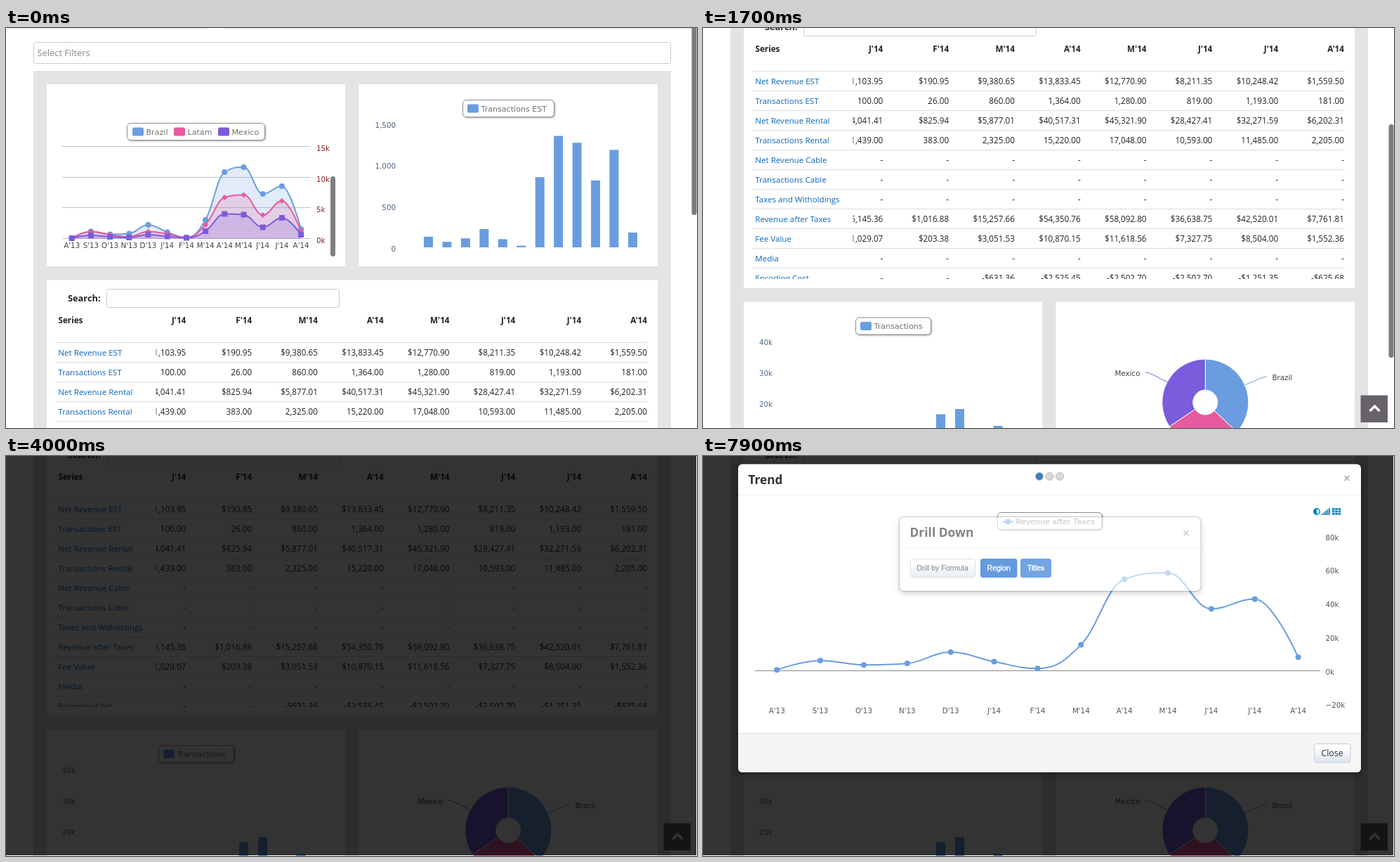
Animation of 984x569 px, one loop 8 s. Source, as an HTML page:

```html
<!DOCTYPE html>
<html lang="en">
<head>
<meta charset="utf-8">
<title>Revenue dashboard</title>
<style>
html, body { margin: 0; width: 100%; height: 100%; overflow: hidden; background: #fff; }
svg { display: block; font-family: "Open Sans", "Noto Sans", sans-serif; }
.box { fill: #fff; stroke: #909090; filter: drop-shadow(1px 1px 1px rgba(0,0,0,.35)); }
.window { fill: #fff; stroke: rgba(0,0,0,.3); stroke-width: 2; paint-order: stroke; filter: drop-shadow(0 3px 4px rgba(0,0,0,.3)); }
.ui { font-family: "Liberation Sans", Arial, sans-serif; }
.plot { font-family: "DejaVu Sans", sans-serif; }
</style>
</head>
<body>
<svg id="stage" width="984" height="569" viewBox="0 0 984 569"></svg>
<script>
const BLUE = '#699de0', PINK = '#e85a9e', PURPLE = '#7a5cdc', INK = '#222';
const MONTHS = "A'13 S'13 O'13 N'13 D'13 J'14 F'14 M'14 A'14 M'14 J'14 J'14 A'14".split(' ');

// Text is placed by the vertical centre of its capitals.
const text = (x, y, str, size, fill, anchor = 'start', extra = '') =>
  `<text x="${x}" y="${y + size * .36}" font-size="${size}" fill="${fill}" text-anchor="${anchor}" ${extra}>${str}</text>`;
const axisText = (x, y, str, fill, anchor) => text(x, y, str, 10.3, fill, anchor, 'class="plot"');
const legendText = (x, y, str) => text(x, y, str, 11.1, '#707070', 'start', 'class="plot"');
const rect = (x, y, w, h, fill, extra = '') =>
  `<rect x="${x}" y="${y}" width="${w}" height="${h}" fill="${fill}" ${extra}/>`;
const box = (x, y, w, h, r, cls = 'box') =>
  `<rect class="${cls}" x="${x}" y="${y}" width="${w}" height="${h}" rx="${r}"/>`;
const line = (x1, y1, x2, y2, stroke, w = 1) =>
  `<path d="M${x1} ${y1}L${x2} ${y2}" stroke="${stroke}" stroke-width="${w}"/>`;
const circle = (x, y, r, fill, extra = '') => `<circle cx="${x}" cy="${y}" r="${r}" fill="${fill}" ${extra}/>`;
const group = (id, body) => `<g id="${id}">${body}</g>`;
const BOLD = 'font-weight="700"';

// Smooth curve that never overshoots its neighbouring points.
function spline(pts) {
  let d = `M${pts[0]}`, out = pts[0];
  for (let i = 1; i < pts.length; i++) {
    const [x, y] = pts[i], [px, py] = pts[i - 1];
    let left = [x, y], right = [x, y];
    if (i < pts.length - 1) {
      const [nx, ny] = pts[i + 1];
      const lx = (1.5 * x + px) / 2.5, rx = (1.5 * x + nx) / 2.5;
      let ly = (1.5 * y + py) / 2.5, ry = (1.5 * y + ny) / 2.5;
      const fix = (ry - ly) * (rx - x) / (rx - lx) + y - ry;
      ly += fix; ry += fix;
      const lc = Math.min(Math.max(ly, Math.min(py, y)), Math.max(py, y));
      if (lc !== ly) { ly = lc; ry = 2 * y - ly; }
      const rc = Math.min(Math.max(ry, Math.min(ny, y)), Math.max(ny, y));
      if (rc !== ry) { ry = rc; ly = 2 * y - ry; }
      left = [lx, ly]; right = [rx, ry];
    }
    d += `C${out} ${left} ${x},${y}`;
    out = right;
  }
  return d;
}

function legend(x, y, w, items) {
  return box(x, y, w, 24, 5) + items.map(([ix, name, color]) =>
    rect(ix, y + 6, 16, 12, color, 'rx="2"') + legendText(ix + 19.5, y + 12.5, name)).join('');
}

function areaChart() {
  const xs = MONTHS.map((_, i) => 93.7 + 27.2 * i);
  const marks = [
    (x, y) => circle(x, y, 4, BLUE),
    (x, y) => `<path d="M${x} ${y - 4}l4 4l-4 4l-4 -4z" fill="${PINK}"/>`,
    (x, y) => rect(x - 4, y - 4, 8, 8, PURPLE)
  ];
  const series = [
    [BLUE, [299, 289.5, 293.5, 292.5, 280, 290.5, 298, 273, 205, 198, 236, 225, 286]],
    [PINK, [299, 289.5, 294, 297, 289.5, 293, 298, 280, 241, 237.5, 266, 246, 289]],
    [PURPLE, [299, 295, 297, 298, 294, 296.5, 298.5, 289, 264.5, 265.5, 283.5, 270, 294]]
  ];
  let s = '';
  ['15k', '10k', '5k', '0k'].forEach((k, i) => {
    const y = Math.round(169 + 43.7 * i) - .5;
    s += line(80, y, 434, y, '#c0c0c0') + axisText(442, y + 2.5, k, '#8b1f1f');
  });
  series.forEach(([color, ys], n) => {
    const pts = ys.map((y, i) => [xs[i], y]), d = spline(pts);
    s += `<path d="${d}L${xs[12]} 300L${xs[0]} 300z" fill="${color}" fill-opacity=".2"/>
      <path d="${d}" fill="none" stroke="${color}" stroke-width="2"/>` +
      pts.map(p => marks[n](...p)).join('');
  });
  s += MONTHS.map((m, i) => axisText(xs[i], 309, m, '#444', 'middle')).join('');
  return s + legend(172.5, 135.5, 196, [[180, 'Brazil', BLUE], [239, 'Latam', PINK], [302, 'Mexico', PURPLE]]);
}

function barChart() {
  const values = [130, 68, 110, 224, 100, 20, 860, 1364, 1280, 819, 1193, 181];
  return ['1,500', '1,000', '500', '0'].map((k, i) => axisText(555, 138 + 58.6 * i, k, '#4d6180', 'end')).join('') +
    values.map((v, i) => rect(595 + 26.45 * i, 312 - v * .1162, 13, v * .1162, BLUE)).join('') +
    legend(650.5, 102.5, 130, [[657, 'Transactions EST', BLUE]]);
}

function table() {
  const right = i => 256.3 + 93.8 * i;
  const none = '- - - - - - - -';
  const rows = [
    ['Net Revenue EST', '$1,103.95 $190.95 $9,380.65 $13,833.45 $12,770.90 $8,211.35 $10,248.42 $1,559.50'],
    ['Transactions EST', '100.00 26.00 860.00 1,364.00 1,280.00 819.00 1,193.00 181.00'],
    ['Net Revenue Rental', '$4,041.41 $825.94 $5,877.01 $40,517.31 $45,321.90 $28,427.41 $32,271.59 $6,202.31'],
    ['Transactions Rental', '1,439.00 383.00 2,325.00 15,220.00 17,048.00 10,593.00 11,485.00 2,205.00'],
    ['Net Revenue Cable', none],
    ['Transactions Cable', none],
    ['Taxes and Witholdings', none],
    ['Revenue after Taxes', '$5,145.36 $1,016.88 $15,257.66 $54,350.76 $58,092.80 $36,638.75 $42,520.01 $7,761.81'],
    ['Fee Value', '$1,029.07 $203.38 $3,051.53 $10,870.15 $11,618.56 $7,327.75 $8,504.00 $1,552.36'],
    ['Media', none],
    ['Encoding Cost', '- - -$631.36 -$2,525.45 -$2,502.70 -$2,502.70 -$1,251.35 -$625.68']
  ];
  const head = text(88, 384, 'Search:', 12.8, INK, 'start', BOLD) +
    rect(143.5, 371.5, 331, 26, '#fff', 'stroke="#ccc" rx="3"') +
    text(74.5, 416, 'Series', 11.7, INK, 'start', BOLD) +
    MONTHS.slice(5).map((m, i) => text(right(i), 416, m, 11.7, INK, 'end', BOLD)).join('');
  let cells = '', names = '', rules = '';
  rows.forEach(([name, values], r) => {
    const y = 461.5 + 28 * r;
    values.split(' ').forEach((v, i) => cells += text(right(i), y, v, 11.7, INK, 'end'));
    const hot = name === 'Revenue after Taxes';
    if (hot) names += group('hover', rect(70, y - 13, 143, 27, '#f2f2f2'));
    names += text(74.3, y, name, 11.6, '#0b66b8', 'start', hot ? 'id="hot"' : '');
    rules += line(70, y - 14, 914, y - 14, '#ddd');
  });
  return head + `<g clip-path="url(#rows)">${cells}${rect(70, 440, 143.5, 310, '#fff')}${names}${rules}</g>`;
}

function lowerCharts() {
  const at = (deg, r) => {
    const a = deg * Math.PI / 180;
    return `${715.3 + r * Math.sin(a)} ${918.5 - r * Math.cos(a)}`;
  };
  const slice = (a, b, color) =>
    `<path d="M${at(a, 61.5)}A61.5 61.5 0 0 1 ${at(b, 61.5)}L${at(b, 17.5)}A17.5 17.5 0 0 0 ${at(a, 17.5)}z" fill="${color}" stroke="#fff"/>`;
  return ['40k', '30k', '20k'].map((k, i) => axisText(80, 833.5 + 43.8 * i, k, '#4d6499')).join('') +
    [[332, 935.5], [359, 928], [413.5, 952]].map(([x, y]) => rect(x, y, 13, 40, BLUE)).join('') +
    legend(217.5, 798, 107, [[224, 'Transactions', BLUE]]) +
    slice(0, 133, BLUE) + slice(133, 236, PINK) + slice(236, 360, PURPLE) +
    `<path d="M630 876C636 876 642 880 661 889.5" fill="none" stroke="${PURPLE}"/>
     <path d="M803 882C797 882 791 886 772 893.5" fill="none" stroke="${BLUE}"/>` +
    axisText(622.5, 877, 'Mexico', '#444', 'end') + axisText(810.5, 883.5, 'Brazil', '#444');
}

function page() {
  return line(2, .5, 288, .5, '#ddd') + line(312, .5, 984, .5, '#ddd') +
    rect(39.5, 20.5, 907, 30, '#fff', 'stroke="#ccc" rx="2"') +
    text(44.5, 35.5, 'Select Filters', 12.9, '#8c8c8c') +
    rect(39, 61, 908, 1000, '#e4e4e4') +
    rect(58, 80, 425, 259, '#fff') + rect(502.5, 80, 425.5, 259, '#fff') +
    rect(58, 358.5, 870, 397.5, '#fff') +
    rect(58, 775.5, 425, 300, '#fff') + rect(502.5, 775.5, 425.5, 300, '#fff') +
    areaChart() + barChart() + table() + lowerCharts() +
    rect(462, 211, 7, 114, '#7f7f7f', 'id="chartBar" rx="3.5"');
}

const trend = [.2, 5.8, 3.2, 4.1, 10.8, 5.15, 1.02, 15.26, 54.35, 58.09, 36.64, 42.52, 7.76]
  .map((v, i) => [105.2 + 61.87 * i, 304.8 - v * 2.385]);

function tooltip() {
  const pill = (x, y, w, h, color) => rect(x, y, w, h, color, 'rx="3"');
  const tag = (x, y, str, size = 10.2) => text(x, y, str, size, '#fff', 'middle', BOLD);
  const title = (y, str) => text(413.5, y, str, 11.6, '#333', 'start', 'class="plot" stroke="#333" stroke-width=".3"');
  return rect(406.5, 119.5, 182, 126.5, '#fff', 'rx="2" fill-opacity=".85"') +
    rect(406.5, 119.5, 182, 126.5, 'none', `rx="2" stroke="${BLUE}" style="filter:drop-shadow(1px 1px 1px rgba(0,0,0,.3))"`) +
    title(135, 'Revenue after Taxes') + title(151.5, "A'14: $54,350.76") +
    pill(424, 171, 64, 43.5, '#999') + pill(505, 178, 68, 30, '#999') +
    pill(424, 220, 64, 17, '#2e8f49') + pill(505, 220, 68, 17, '#2e8f49') +
    tag(456, 179.5, 'Summary') + tag(456, 193, 'Net') + tag(456, 206.5, 'Revenue') +
    tag(539, 186.5, 'Taxes and') + tag(539, 199.5, 'Witholdings') +
    tag(456.3, 228.5, '$54,350.76', 10.7) + tag(539, 228.5, '$0.00', 10.7) +
    text(497, 229, '–', 11, '#333', 'middle');
}

function icons() {
  const c = '#0a84c6';
  let s = circle(874, 79, 4.3, 'none', `stroke="${c}" stroke-width="1.5"`) +
    `<path d="M874 74.5a4.5 4.5 0 0 0 0 9z" fill="${c}"/>`;
  for (let i = 0; i < 5; i++) s += rect(881 + 2.5 * i, 82 - 2 * i, 1.8, 2 + 2 * i, c);
  for (let i = 0; i < 9; i++) s += rect(896 + i % 3 * 4.3, 74 + Math.floor(i / 3) * 3.5, 3.5, 2.8, c);
  return s;
}

const cross = (x, y) => text(x, y, '×', 18, '#b4b4b4', 'middle', BOLD);

function modal() {
  const chart = line(74, 305.5, 879, 305.5, '#888') +
    ['80k', '60k', '40k', '20k', '0k', '−20k'].map((k, i) => axisText(886.5, 116 + 47.7 * i, k, '#555')).join('') +
    MONTHS.map((m, i) => axisText(trend[i][0], 362.5, m, '#555', 'middle')).join('') +
    `<path id="cross" d="M599.5 113V352" stroke="#c0c0c0"/>` +
    `<g clip-path="url(#reveal)"><path id="curve" d="${spline(trend)}" fill="none" stroke="${BLUE}"/>` +
    trend.map(([x, y], i) => circle(x, y, 4, BLUE, i === 8 ? 'id="dot"' : '')).join('') + '</g>' +
    box(419.5, 80.5, 148.5, 24, 5) + line(426, 93.5, 442, 93.5, BLUE, 2) + circle(434, 93.5, 4, BLUE) +
    legendText(445.5, 93.5, 'Revenue after Taxes') + icons() + group('tip', tooltip());
  return box(50, 11.5, 887, 438.5, 6, 'window') +
    `<path d="M50 394.5H937V444a6 6 0 0 1 -6 6H56a6 6 0 0 1 -6 -6z" fill="#f5f5f5"/>` +
    line(50, 394.5, 937, 394.5, '#ddd') + line(50, 55.5, 937, 55.5, '#eee') +
    text(64.5, 33.5, 'Trend', 17.2, '#333', 'start', BOLD) + cross(917, 31.5) +
    rect(870.5, 409.5, 51.5, 26.5, 'url(#btn)', 'stroke="#c8ccd0" rx="3"') +
    text(896, 422.5, 'Close', 12.3, '#333', 'middle') + group('chart', chart);
}

function drill() {
  const button = (id, x, w, name) => rect(x, 146, w, 27, '#0058c8', `id="${id}" rx="3.5"`) +
    text(x + w / 2, 159.5, name, 10.5, '#fff', 'middle', 'class="ui" stroke="#fff" stroke-width=".4"');
  return box(280, 87, 428.5, 105, 6, 'window') + line(280, 131, 708.5, 131, '#eee') +
    text(294.5, 109, 'Drill Down', 17.4, '#333', 'start', BOLD) + cross(688, 110) +
    rect(295.5, 146.5, 92, 26, 'url(#btn)', 'stroke="#c8ccd0" rx="3.5"') +
    text(341, 159.5, 'Drill by Formula', 10.5, '#333', 'middle', 'class="ui"') +
    button('region', 395, 52.5, 'Region') + button('titles', 452, 44, 'Titles');
}

const $ = id => document.getElementById(id);
$('stage').innerHTML = `<defs>
  <clipPath id="rows"><rect x="58" y="440" width="870" height="303"/></clipPath>
  <clipPath id="reveal"><rect id="revealBox" x="74" y="100" width="0" height="270"/></clipPath>
  <linearGradient id="btn" x2="0" y2="1"><stop offset=".2" stop-color="#fff"/><stop offset="1" stop-color="#dbe3ec"/></linearGradient>
  </defs>` +
  group('page', page()) +
  rect(976.5, 0, 7, 332, '#7b7b7b', 'id="thumb" rx="3.5"') +
  group('toTop', rect(936.5, 522.5, 38.5, 38.5, '#67626a') +
    '<path d="M949.5 545l7 -7l7 7" fill="none" stroke="#fff" stroke-width="3.5"/>') +
  rect(0, 0, 983, 568, '#000', 'id="shade"') +
  group('modal', modal()) + group('drill', drill()) +
  group('loader', [479, 493.5, 508].map(x => circle(x, 29, 5.5, '#d8d8d8', 'stroke="#bbb"')).join(''));

const ramp = (t, a, b) => Math.min(1, Math.max(0, (t - a) / (b - a)));
const smooth = u => u * u * (3 - 2 * u);
const set = (id, key, value) => $(id).setAttribute(key, value);
const fade = (id, value) => set(id, 'opacity', +value);

function draw(t) {
  const scroll = Math.round(386 * smooth(ramp(t, 350, 1700) ** 1.547));
  set('page', 'transform', `translate(0 ${-scroll})`);
  set('thumb', 'y', -66 + .526 * scroll);
  fade('thumb', 1 - ramp(t, 2100, 2500));
  fade('chartBar', 1 - ramp(t, 300, 700));
  fade('toTop', ramp(t, 700, 1000));

  const hover = t >= 3400 && t < 3800;
  fade('hover', hover);
  set('hot', 'fill', hover ? '#153a66' : '#0b66b8');

  fade('shade', .8 * ramp(t, 3700, 4000));
  const enter = ramp(t, 4500, 4800);
  fade('modal', enter);
  set('modal', 'transform', `translate(0 ${-150 * (1 - enter) ** 2})`);
  fade('chart', t >= 4800);
  set('revealBox', 'width', 810 * smooth(ramp(t, 4800, 5700)));

  const tip = t >= 6300 && t < 7000;
  fade('tip', tip);
  fade('cross', tip);
  set('curve', 'stroke-width', tip ? 3 : 2);
  set('dot', 'r', tip ? 5.5 : 4);

  fade('drill', ramp(t, 7100, 7400) - ramp(t, 7800, 8050));
  set('titles', 'fill', t >= 7600 ? '#1468cc' : '#0058c8');
  fade('loader', t >= 7600);
  const active = Math.floor((t - 7600) / 100) % 3;
  [...$('loader').children].forEach((dot, i) => dot.setAttribute('fill', i === active ? '#3f7fbf' : '#d8d8d8'));
}

// The picture advances ten times a second.
const start = performance.now();
function tick() {
  const t = (performance.now() - start) % 8000;
  draw(t - t % 100);
  requestAnimationFrame(tick);
}
tick();
</script>
</body>
</html>
```
